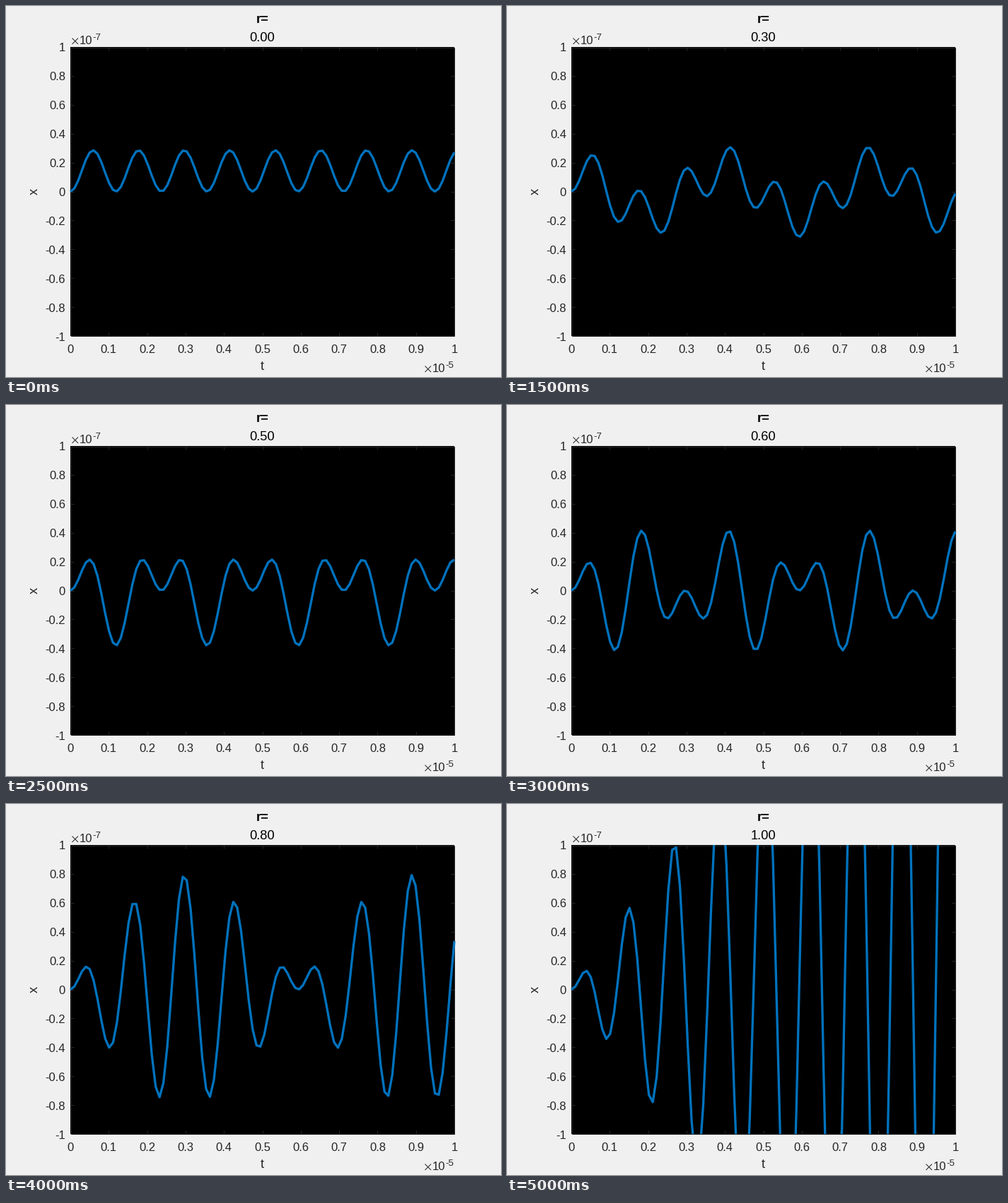
Write a matplotlib script that moves like this. It is 700 px wide and 525 px high and loops after 5500 ms.

```python
import numpy as np
import matplotlib.pyplot as plt
from matplotlib.animation import FuncAnimation
from matplotlib.patches import Rectangle

plt.rcParams["font.family"] = "Liberation Sans"
plt.rcParams["path.simplify"] = False

W, H, DPI = 700, 525, 100
LEFT, RIGHT, TOP, BOTTOM = 91, 634, 58, 467
PX = 72 / DPI
INK = (0.15, 0.15, 0.15)
W0 = 5.295e6      # natural angular frequency
FORCE = 4e5       # drive amplitude per unit mass
FRAMES = 11

fig = plt.figure(figsize=(W / DPI, H / DPI), dpi=DPI, facecolor="#f0f0f0")
ax = fig.add_axes([0, 0, 1, 1])
ax.set_xlim(0, W)
ax.set_ylim(H, 0)
ax.axis("off")


def label(x, y, s, size=12, ha="center", color=INK, **kw):
    return ax.text(x, y, s, fontsize=size, ha=ha, va="baseline", color=color, **kw)


def hairline(xs, ys):
    ax.plot(xs, ys, color=INK, lw=PX, zorder=2, solid_capstyle="butt")


def power(x, y, exponent):
    """Axis multiplier: a thin cross, 10 and a raised exponent."""
    for a, b in ((-8.5, 0), (0, -8.5)):
        hairline([x + 1.5, x + 10], [y + a, y + b])
    label(x + 12, y, "10", ha="left")
    label(x + 30.5, y - 6, exponent, 9.6, ha="left")


def px(u):
    return LEFT + u * (RIGHT - LEFT)


def py(v):
    return (TOP + BOTTOM) / 2 - v * (BOTTOM - TOP) / 2


def response(t, r):
    if abs(1 - r) < 1e-9:
        return FORCE / W0 * t * np.sin(W0 * t) / 2
    return FORCE / W0**2 / (1 - r * r) * (np.cos(r * W0 * t) - np.cos(W0 * t))


ax.add_patch(Rectangle((LEFT, TOP), RIGHT - LEFT, BOTTOM - TOP, fc="black", lw=0, zorder=1))
ax.add_patch(Rectangle((LEFT + 0.5, TOP + 0.5), RIGHT - LEFT - 1, BOTTOM - TOP - 1,
                       fill=False, ec=INK, lw=PX, zorder=2))

TICK = 5.4
for k in range(11):
    u, v = k / 10, k / 5 - 1
    x, y = px(u), py(v)
    label(x, 491, f"{u:g}")
    label(84, y + 6.5, f"{round(v, 1):g}", ha="right")
    if 0 < k < 10:
        for a, b in ((TOP, TOP + TICK), (BOTTOM - TICK, BOTTOM)):
            hairline([x, x], [a, b])
        for a, b in ((LEFT, LEFT + TICK), (RIGHT - TICK, RIGHT)):
            hairline([a, b], [y, y])

power(92, 54, "-7")
power(591, 518, "-5")
label(362.5, 515, "t", 13.2)
label(45, 262.5, "x", 13.2, rotation=90, rotation_mode="anchor")
label(362.5, 24, "r=", 13.2, color="black", weight="bold")
value = label(362.5, 50, "", 13.2, color="black")

t = np.linspace(0, 1e-5, 100)
curve, = ax.plot([], [], color="#0072bd", lw=2.4, zorder=3,
                 solid_joinstyle="round", solid_capstyle="butt")
curve.set_clip_path(Rectangle((0, TOP), W, BOTTOM - TOP, transform=ax.transData))


def draw(i):
    r = i / 10
    curve.set_data(px(t / 1e-5), py(response(t, r) / 1e-7))
    value.set_text(f"{r:.2f}")
    return curve, value


anim = FuncAnimation(fig, draw, frames=FRAMES, interval=500, repeat=True, repeat_delay=0)
plt.show()
```
